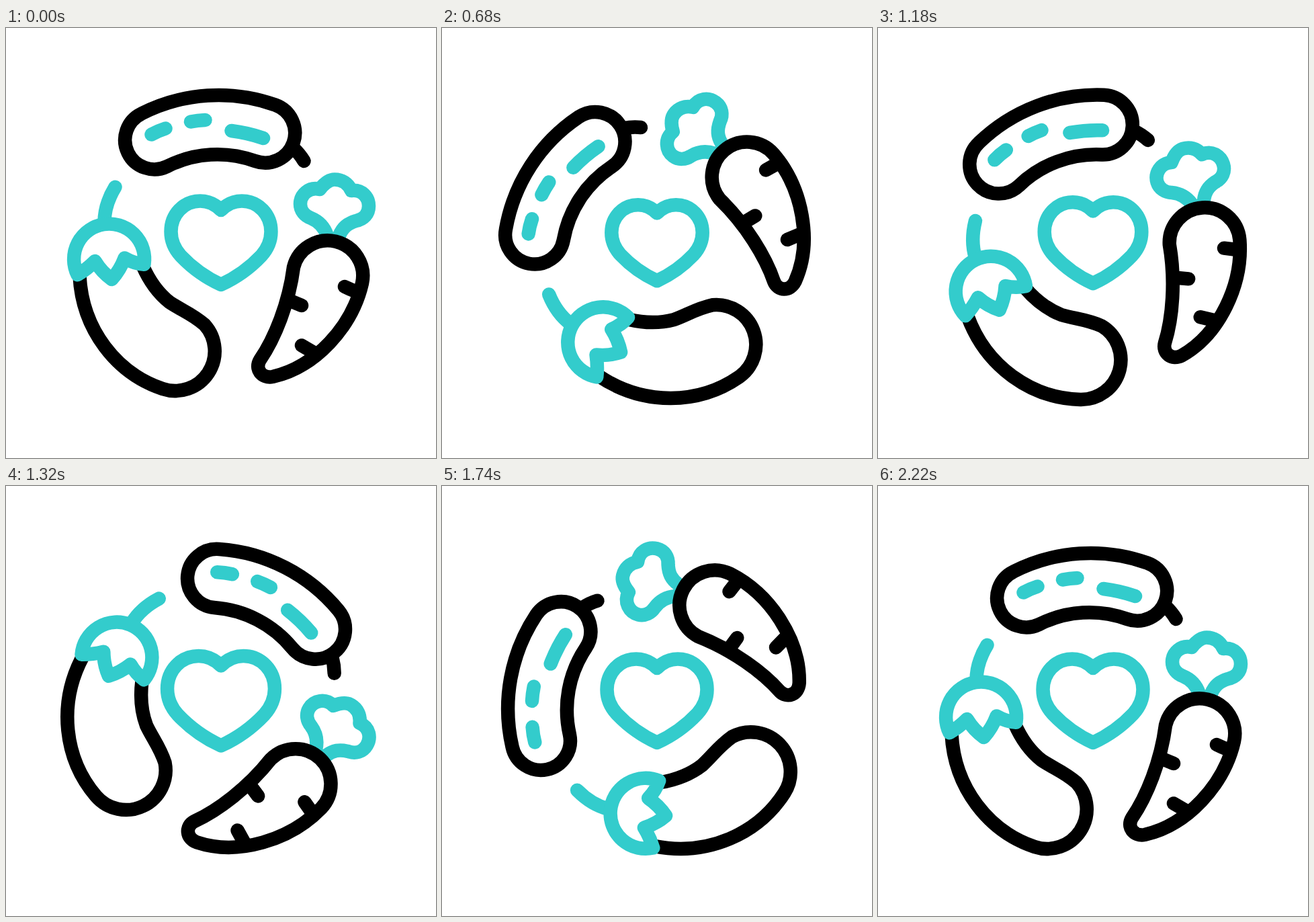
Animation of 640 by 640 pixels, one loop 2400 ms. Source, as an HTML page:

```html
<!DOCTYPE html>
<html lang="en">
<head>
<meta charset="utf-8">
<title>Vegetables around a heart</title>
<style>
  html, body { margin: 0; width: 100%; height: 100%; overflow: hidden; background: #fff; }
  svg { display: block; width: 100%; height: 100%; }
  path { fill: none; stroke: #000; stroke-width: 20.5; stroke-linecap: round; stroke-linejoin: round; }
  .teal { stroke: #33cccc; }
  .flat { stroke-linecap: butt; }
</style>
</head>
<body>
<svg viewBox="0 0 640 640">
  <g id="ring">
    <!-- cucumber -->
    <path d="M427 178Q437 187 443.500 198"/>
    <path d="M201.800 127.400A253 253 0 0 1 400.800 114.500A43.500 43.500 0 0 1 370.800 198A166 166 0 0 0 239.800 206A43.500 43.500 0 0 1 201.800 127.400Z"/>
    <path class="teal" d="M216.500 158.500Q226.500 153 237.500 149.500M275 139.500Q285 137.500 296.500 137M335.500 153Q360 156 383 164"/>
    <!-- carrot -->
    <path class="teal" d="M478 309C474 297 466 288 454 283C445 280 438 272 438 262C438 248 451 236 467 240C474 231 481 225.500 489 225.500C500 225.500 509 231 514 242C530 240 540 252 540 265C540 277 532 285 521 287C508 291 501 297 496 309"/>
    <path d="M428 356C421 410 400 462 378 494C370 507 380 522 397 519C460 505 515 445 530 380A52.400 52.400 0 0 0 428 356Z"/>
    <path d="M423 406L440 413M504 385L522 393M440 472.500L458 483"/>
    <!-- eggplant -->
    <path class="flat" d="M109.500 369C113.500 449 164.500 514 233 537A59 59 0 0 0 295.500 441.500C277 425.500 261 420 243.500 408.300Q218.500 388.500 203.500 354"/>
    <path class="teal" d="M146.500 289Q146.500 263 162.500 236.700"/>
    <path class="teal" d="M106.500 367.300A52.500 52.500 0 1 1 205.500 351.800Q190.500 350.500 176.500 342.500Q170 360 157.500 374Q142.500 363.500 132.500 347Q120.500 359 106.500 367.300Z"/>
  </g>
  <path id="heart" class="teal" d="M0 -49C-9 -58 -20 -62.500 -31 -62.500C-56 -62.500 -74.500 -42 -74.500 -17C-74.500 -2 -69 9 -60 19C-44 36 -24 51 0 62C24 51 44 36 60 19C69 9 74.500 -2 74.500 -17C74.500 -42 56 -62.500 31 -62.500C20 -62.500 9 -58 0 -49Z"/>
</svg>
<script>
const LOOP = 2400, STROKE = 20.5;
const BACK = -55, TURN = 816, END = 2223;
const ring = document.getElementById('ring');
const heart = document.getElementById('heart');

const clamp = v => Math.min(1, Math.max(0, v));
const part = (t, a, b) => clamp((t - a) / (b - a));
const mix = (a, b, k) => a + (b - a) * k;
const smooth = k => k * k * (3 - 2 * k);

// Symmetric cubic bezier (p, 0, 1 - p, 1), solved by bisection.
function ease(x, p) {
  let lo = 0, hi = 1;
  for (let i = 0; i < 30; i++) {
    const u = (lo + hi) / 2, v = 1 - u;
    if (3 * v * v * u * p + 3 * v * u * u * (1 - p) + u * u * u < x) lo = u;
    else hi = u;
  }
  return smooth(lo);
}

// Wind back, then one full turn forward.
function angle(t) {
  if (t < TURN) return BACK * ease(part(t, 0, TURN), 0.6);
  return mix(BACK, 360, ease(part(t, TURN, END), 0.59));
}

// Slow squeeze, quick swell, settle.
function swell(t) {
  if (t < 1040) return mix(1, 0.866, Math.pow(part(t, 0, 1040), 0.9));
  if (t < 1320) return mix(0.866, 1.073, smooth(part(t, 1040, 1320)));
  return mix(1.073, 1, smooth(part(t, 1320, 1740)));
}

function draw(t) {
  const s = swell(t);
  ring.setAttribute('transform', `rotate(${angle(t)} 320 320)`);
  heart.setAttribute('transform', `translate(320 320) scale(${s})`);
  heart.style.strokeWidth = STROKE / s;
}

const start = performance.now();
function tick() {
  draw((performance.now() - start) % LOOP);
  requestAnimationFrame(tick);
}
draw(0);
requestAnimationFrame(tick);
</script>
</body>
</html>
```
